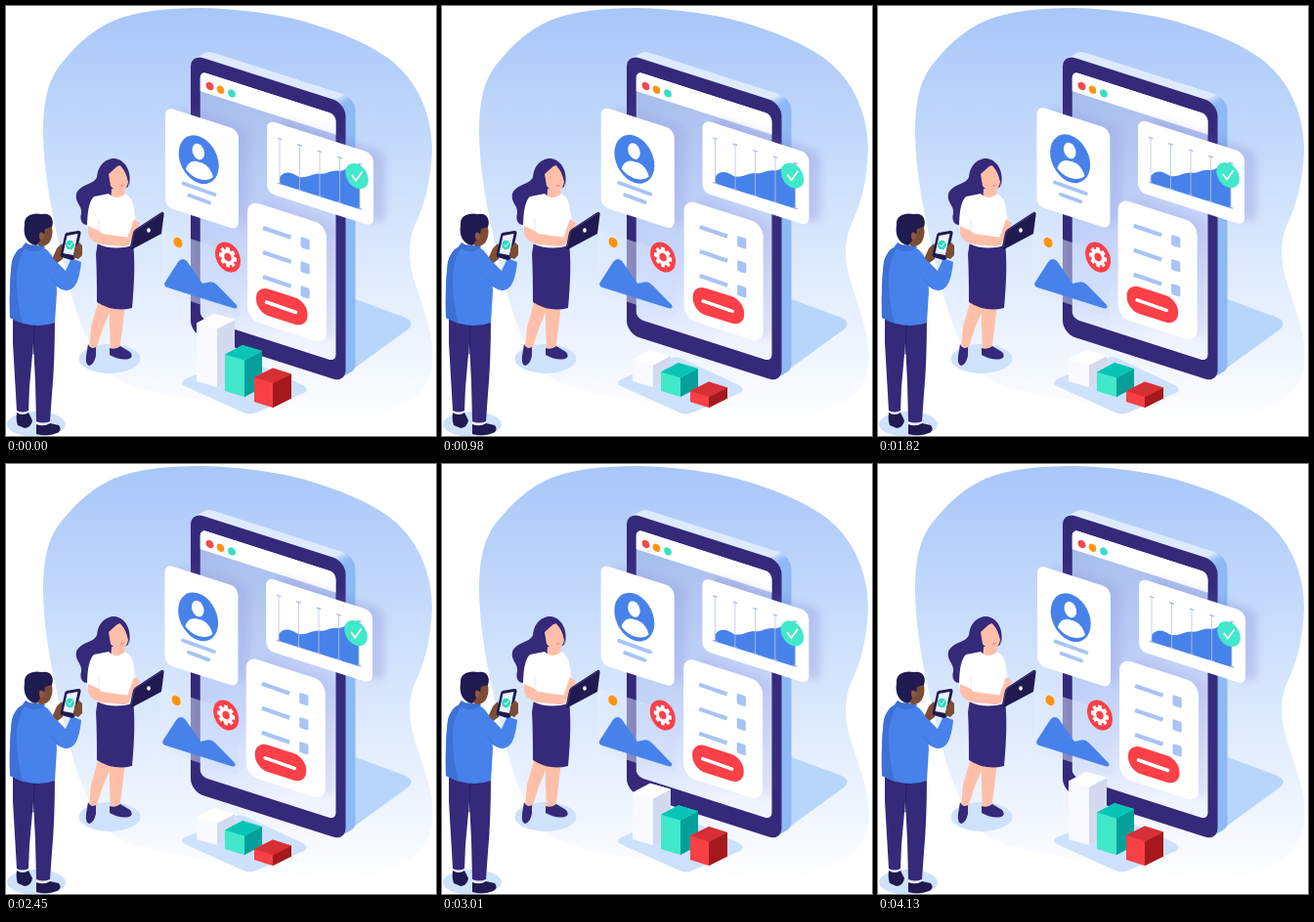
These frames come from a looping animation (440 by 440 pixels, 4200 ms). An HTML page with a canvas:

```html
<!DOCTYPE html>
<html lang="en">
<head>
<meta charset="utf-8">
<title>App dashboard</title>
<style>
  html, body { margin: 0; width: 100%; height: 100%; overflow: hidden; background: #fff; }
  canvas { display: block; width: 440px; height: 440px; }
</style>
</head>
<body>
<canvas id="stage"></canvas>
<script>
const SIZE = 440, LOOP = 4200, STEP = 70, SLOPE = 0.32;
const NAVY = '#35297a', INK = '#1f1a50', BLUE = '#4782ea', PALE = '#a8c4f5';
const RED = '#fb4048', TEAL = '#42e8ca', SKIN = '#ffbfa9', BROWN = '#7c4c36';
const canvas = document.getElementById('stage');
const ctx = canvas.getContext('2d');
const dpr = window.devicePixelRatio || 1;
canvas.width = canvas.height = SIZE * dpr;

function grad(x0, y0, x1, y1, ...stops) {
  const g = ctx.createLinearGradient(x0, y0, x1, y1);
  stops.forEach((c, i) => g.addColorStop(i / (stops.length - 1), c));
  return g;
}
function shape(d, fill) {
  ctx.fillStyle = fill;
  ctx.fill(new Path2D(d));
}
function stroke(d, color, width, cap = 'round') {
  ctx.strokeStyle = color;
  ctx.lineWidth = width;
  ctx.lineCap = cap;
  ctx.lineJoin = 'round';
  ctx.stroke(new Path2D(d));
}
function oval(x, y, rx, ry, fill) {
  ctx.fillStyle = fill;
  ctx.beginPath();
  ctx.ellipse(x, y, rx, ry, 0, 0, Math.PI * 2);
  ctx.fill();
}
// Runs a drawing with its origin at x, y on the slanted screen plane.
function slant(x, y, draw) {
  ctx.save();
  ctx.transform(1, SLOPE, 0, 1, x, y);
  draw();
  ctx.restore();
}
function panel(x, y, w, h, r, fill) {
  slant(x, y, () => {
    ctx.fillStyle = fill;
    ctx.beginPath();
    ctx.roundRect(0, 0, w, h, r);
    ctx.fill();
  });
}
function disc(x, y, rx, ry, fill) {
  slant(x, y, () => oval(0, 0, rx, ry, fill));
}
function card(x, y, w, h, r, shade) {
  ctx.save();
  ctx.shadowColor = `rgba(100,95,190,${shade})`;
  ctx.shadowBlur = 9 * dpr;
  ctx.shadowOffsetX = 12 * dpr;
  ctx.shadowOffsetY = -2 * dpr;
  panel(x, y, w, h, r, '#fff');
  ctx.restore();
}
function moved(dx, dy, draw) {
  ctx.save();
  ctx.translate(dx, dy);
  draw();
  ctx.restore();
}

function backdrop() {
  ctx.fillStyle = '#fff';
  ctx.fillRect(0, 0, SIZE, SIZE);
  shape('M38 132C38 98 42 76 58 57C74 38 88 25 110 15C135 5 165 2 200 2C240 3 275 8 304 15.5C340 26 370 38 392 54C422 77 436 112 436 147C435 180 428 205 418 225C411 243 412 262 418 282C425 305 437 333 437 360C436 385 425 398 408 406C385 419 365 427 335 427C300 424 270 414 240 408C190 402 140 397 110 380C78 350 67 295 57 255C46 209 39 171 38 132Z',
    grad(0, 0, 0, 428, '#a8c6f9', '#b9d2fa', '#cbdffc', '#dce9fd', '#edf4fe', '#fff'));
  shape('M355 299L409 319Q419 324 411 331L352 374L338 365Z', '#b8d6fc');
}

function phone() {
  const side = grad(145, 0, 154, 0, '#deeaff', '#8db9f4');
  for (let i = 10; i > 0; i--) panel(189 + i, 49 - i * 0.55, 158.5, 285, 13, side);
  panel(189, 49, 158.5, 286, 13, NAVY);
  slant(198.5, 66.5, () => {
    ctx.beginPath();
    ctx.roundRect(0, 0, 139, 253, 7);
    ctx.save();
    ctx.clip();
    ctx.fillStyle = grad(0, 0, 140, 215, '#a2b9e8', '#b4c8f3', '#c8d7fa', '#f0f4ff');
    ctx.fillRect(0, 0, 140, 254);
    ctx.fillStyle = '#fff';
    ctx.fillRect(0, 0, 140, 20.5);
    ctx.restore();
  });
  disc(208.5, 82, 3.9, 4, '#f4484b');
  disc(219.5, 85.7, 3.9, 4, '#ff9419');
  disc(231, 89.4, 3.9, 4, '#39dfc4');
}

function profile() {
  card(163, 103, 75, 102.5, 8, 0.13);
  disc(197.2, 157.2, 20.5, 24, BLUE);
  disc(196.8, 149, 6.3, 8, '#fff');
  shape('M184 167C186 160 191 157 198 160C205 161 210 167 212 175C206 181 192 178 184 167Z', '#fff');
  stroke('M181.5 181.5L213.5 193', PALE, 3.8);
  stroke('M187.5 193.7L208 201.3', PALE, 3.8);
}

function picture() {
  panel(160, 229, 80, 64, 4, grad(0, 0, 80, 0, 'rgba(228,237,255,.62)', 'rgba(205,218,250,.36)'));
  disc(176, 242, 4.5, 5, '#ff9408');
  shape('M162.5 283L176 262Q180 256.5 185 261L201 284L208 282.5Q212 281.5 216 285.5L236 306Q238 310.5 232 309L165 288Q161 286.5 162.5 283Z', BLUE);
  disc(227, 257, 13, 15, RED);
  slant(227, 257, () => {
    ctx.scale(1, 1.13);
    for (let i = 0; i < 8; i++) {
      ctx.save();
      ctx.rotate(i * Math.PI / 4);
      ctx.fillStyle = '#fff';
      ctx.fillRect(-1.8, -9, 3.6, 4);
      ctx.restore();
    }
    oval(0, 0, 7, 7, '#fff');
    oval(0, 0, 3.7, 3.7, RED);
  });
}

function chart() {
  card(267, 116.5, 109, 74.5, 8, 0.22);
  shape('M280 175C285 168 293 170 299 174.5C306 177 312 172 320 171.5C328 173 333 167 341 169C349 168 353 162 362 162L362 208L280 182Z', BLUE);
  for (let i = 0; i < 5; i++) {
    const x = 280 + i * 20.5, y = 136 + i * 6.4;
    stroke(`M${x} ${y}V${y + 46.5}`, '#b5c4e7', 0.8, 'butt');
    stroke(`M${x - 2.3} ${y - 0.8}l4.6 1.5m-4.6 44.3l4.6 1.5`, '#a1b3df', 1.2, 'butt');
  }
  disc(359, 174, 11.8, 12.5, TEAL);
  stroke('M354.3 173.5L358 178.6L364.2 170', '#fff', 1.8);
}

function list() {
  card(247, 198.5, 81, 122, 12, 0.13);
  for (let i = 0; i < 3; i++) {
    const y = i * 25;
    stroke(`M263 ${227 + y}L291.5 ${236.8 + y}`, PALE, 4.2, 'butt');
    panel(301.5, 236 + y, 9.2, 11, 1.5, PALE);
  }
  panel(256, 285.5, 52.5, 27.5, 13, RED);
  stroke('M266.5 303L296.5 313.5', '#fff', 3.5);
}

// Box standing on its left base corner x, y; h is the wall height.
function block(x, y, a, b, da, db, h, left, right, top) {
  const mid = x + a, end = mid + b, t = y - h;
  shape(`M${x} ${t}L${x + b} ${t - db}L${end} ${t + da - db}V${y + da - db}L${mid} ${y + da}L${x} ${y}Z`, left);
  shape(`M${mid} ${t + da}L${end} ${t + da - db}V${y + da - db}L${mid} ${y + da}Z`, right);
  shape(`M${x} ${t}L${x + b} ${t - db}L${end} ${t + da - db}L${mid} ${t + da}Z`, top);
}

function plate() {
  shape('M183 382L235 360Q241 358 246 361L304 388Q311 392 305 396L256 416Q249 419 243 416L183 389Q177 386 183 382Z', '#cde1fc');
}

function woman() {
  oval(106, 361, 31.5, 15, '#cfe2fc');
  // legs and shoes
  shape('M94 304H110L99 330L92 352L85 351L87 328Z', SKIN);
  shape('M106 304H122L119 331L116 353H107L106 327Z', SKIN);
  shape('M84 346Q87 352 92 349L92 358Q90 367 85 368Q81 367 82 358Z', NAVY);
  shape('M106 350Q112 352 117 348L127 354Q131 359 126 361Q117 363 106 357Z', NAVY);
  shape('M94 241L130 242Q133 266 129 309Q110 314 93 303Q93 270 92 254Z', NAVY);
  // hair behind
  shape('M109 156C98 158 94 166 93 175C90 183 76 182 72 192C70 201 78 204 77 212C75 219 78 225 85 224C94 222 98 214 105 205L111 192L125 185C128 170 123 157 109 156Z', NAVY);
  // torso and sleeves
  shape('M108 187L121 187L123 200L107 203Z', SKIN);
  shape('M105 192Q113 200 122 192Q130 196 131 208L134 229L130 245Q109 251 93 243L94 229L83 227Q83 201 90 195Z', '#fff');
  shape('M84 225L95 230L98 233L119 236L128 238Q128 245 121 246L98 244Q86 241 84 233Z', SKIN);
  shape('M131 218L137 222L132 237L126 241L125 235Z', SKIN);
  stroke('M95 217L95 229', '#dfe8fa', 1);
  // face
  shape('M105 172L116 162L124 172L125 180Q124 187 119 189Q111 190 107 184Z', SKIN);
  shape('M104 187C101 173 106 166 117 163C121 167 124 174 126 184C129 169 122 156 109 156C98 159 96 172 100 185Z', NAVY);
  stroke('M117.5 184Q119.5 185 120.5 183.5', '#ef6f72', 0.9);
  // laptop
  shape('M133 228L159 211Q162 210 161.5 214L159 233L129 249Q126 249 127 246L130 232Q131 229 133 228Z', INK);
  stroke('M128 247L131.5 230L160 212', '#4f4596', 0.8);
  oval(146, 229.5, 1.8, 2.2, '#fff');
  shape('M113 238Q121 235 127 237L126 243L119 246Z', SKIN);
}

function man() {
  oval(31, 428, 30, 13, '#cfe2fc');
  // socks, shoes and trousers
  shape('M12 408H23V420H12ZM31 420H45V430H31Z', '#f1f5ff');
  shape('M11 416Q17 420 23 416L27 424Q26 431 19 432L12 429Q10 424 11 416Z', INK);
  shape('M31 428Q39 431 45 427L54 429Q58 434 52 437Q42 441 31 438Z', INK);
  shape('M7 316L50 319Q50 365 47 397L45 425Q38 428 31 425L30 385L28 345L24 390L23 414Q17 417 11 414Q9 380 7 345Z', NAVY);
  stroke('M29 326L28 356', '#241a5c', 1);
  // far hand
  shape('M52 248L57 243L60 249L58 259L51 264L47 259Z', BROWN);
  // hoodie
  shape('M40 251Q46 253 49 259L61 271L67 258L77 262Q75 282 69 288Q64 293 57 290L43 282Z', BLUE);
  shape('M18 246Q27 242 38 247Q48 252 50 266L52 292L50 324Q28 332 4 319Q3 286 6 262Q9 250 18 246Z', BLUE);
  shape('M18 246Q9 250 6 262Q3 286 4 319L17 325Q10 298 11 274Q13 256 20 247Z', '#3d71d6');
  stroke('M46 279L56 289', '#3a72d8', 1);
  shape('M17 246Q28 256 40 247L38 244Q28 248 20 242Z', '#3d71d6');
  // head
  shape('M27 224L46 221Q49 232 46 239Q43 246 36 246L27 242Z', BROWN);
  shape('M19 224C18 214 28 211 37 213C45 211 50 218 47 226L40 228L39 234Q36 229 34 233L35 240L31 245C22 244 17 235 19 224Z', INK);
  oval(36.5, 235.5, 2.5, 3.5, '#8d5941');
  // handset
  shape('M62 232L74 230Q77 230 76.5 233L71 257Q70 260 67 260L57 257Q55 256 56 253L60 235Q60 233 62 232Z', INK);
  shape('M62.5 235L73.5 233L69 255L58.5 253Z', '#eaf2ff');
  oval(65.5, 244.5, 4.3, 4.8, '#2fd9bf');
  stroke('M63.6 244.6L65.2 246.4L67.7 242.6', '#fff', 1);
  shape('M71 246L75 242L78 245L78 255L74 259L69 257Z', BROWN);
}

const wave = u => (1 - Math.cos(Math.PI * u)) / 2;
const ease = (t, start) => wave(Math.min(1, Math.max(0, (t - start) / 600)));
const drop = (t, down, up) => ease(t, down) - ease(t, up);

function listShift(u) {
  return u < 0.28 ? 1.1 * wave(u / 0.28) : 1.1 - 2.7 * wave((u - 0.28) / 0.72);
}

function render(t) {
  const u = 1 - Math.abs(1 - t / (LOOP / 2));
  const p = wave(u);
  ctx.setTransform(dpr, 0, 0, dpr, 0, 0);
  backdrop();
  phone();
  moved(-0.6 * p, -p, profile);
  moved(-2 * p, 0, picture);
  moved(-p, -p, chart);
  moved(listShift(u), -2.3 * p, list);
  plate();
  block(195, 384, 21, 18, 6, 9.5, 59.5 - 37 * drop(t, 250, 2640),
    '#f8faff', '#d3daef', '#fff');
  block(224, 394, 20, 18, 6, 9.5, 37.5 - 18 * drop(t, 195, 2550),
    TEAL, '#06a09a', '#08c4b6');
  block(254, 405, 19, 19, 6, 9.5, 25 - 14 * drop(t, 170, 2490),
    '#f64046', '#a5191d', '#d63036');
  woman();
  man();
}

function tick() {
  const t = performance.now() % LOOP;
  render(Math.floor(t / STEP) * STEP);
  requestAnimationFrame(tick);
}
tick();
</script>
</body>
</html>
```
